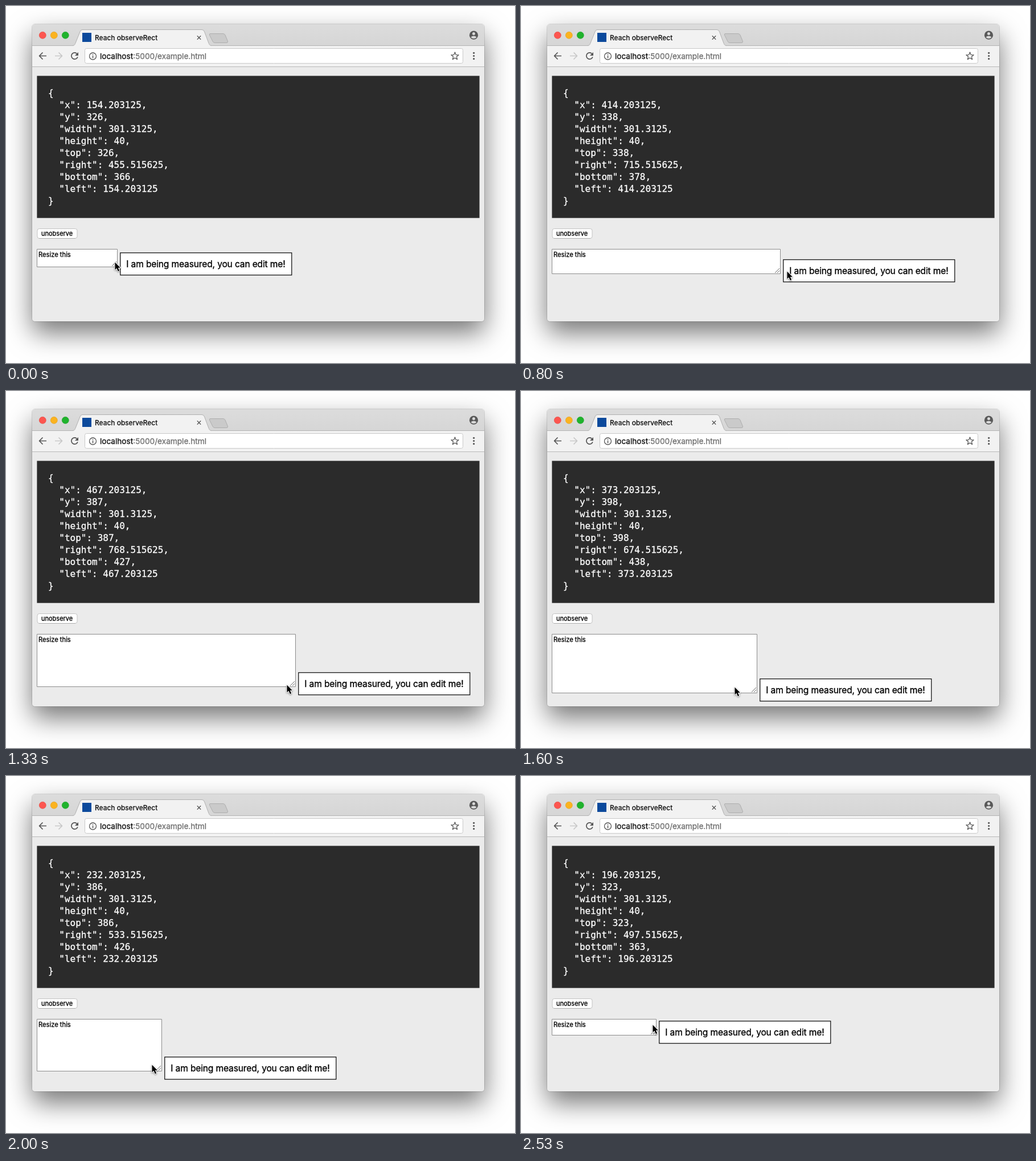
An HTML page with a canvas for the animation above (2600 ms loop, 894x626 px).

```html
<!DOCTYPE html>
<html lang="en">
<head>
<meta charset="utf-8">
<title>observeRect demo</title>
<style>
  html, body { margin: 0; width: 100%; height: 100%; overflow: hidden; background: #fff; }
  canvas { display: block; }
</style>
</head>
<body>
<canvas id="stage" width="894" height="626"></canvas>
<script>
const stage = document.getElementById('stage');
const g = stage.getContext('2d');
const SANS = 'Inter, "Open Sans", sans-serif';
const MONO = '"DejaVu Sans Mono", "Liberation Mono", monospace';
const LOOP = 2600, STEP = 200 / 3;

// [step, x, y] of the measured box, in page coordinates
const PATH = [
  [0, 154, 326], [1, 154, 326], [3, 171, 326], [5, 211, 327], [6, 240, 327],
  [7, 278, 327], [8, 312, 328], [10, 368, 332], [12, 414, 338], [13, 430, 342],
  [14, 445, 349], [16, 465, 364], [17, 467, 369], [18, 468, 375], [19, 471, 381],
  [21, 456, 392], [23, 407, 398], [24, 373, 398], [25, 338, 396], [27, 283, 392],
  [30, 232, 386], [31, 219, 383], [32, 208, 380], [34, 197, 365], [36, 195, 343],
  [38, 196, 323], [39, 194, 313]
];

function slope(i, k) {
  const a = PATH[Math.max(i - 1, 0)], b = PATH[Math.min(i + 1, PATH.length - 1)];
  return (b[k] - a[k]) / (b[0] - a[0]);
}

function boxAt(step) {
  let i = 0;
  while (i < PATH.length - 2 && PATH[i + 1][0] <= step) i++;
  const a = PATH[i], b = PATH[i + 1], span = b[0] - a[0], u = (step - a[0]) / span;
  const hermite = k => {
    const d = b[k] - a[k], m = slope(i, k) * span, n = slope(i + 1, k) * span;
    return Math.round(a[k] + u * (m + u * (3 * d - 2 * m - n + u * (m + n - 2 * d))));
  };
  return { x: hermite(1), y: hermite(2) };
}

// A hairline stroke gives the slightly heavier desktop rendering.
function text(str, x, y, size, color = '#000', family = SANS, spacing = 0) {
  g.font = `${size}px ${family}`;
  g.letterSpacing = spacing + 'px';
  g.fillStyle = g.strokeStyle = color;
  g.lineWidth = .3;
  g.lineJoin = 'round';
  g.fillText(str, x, y);
  g.strokeText(str, x, y);
}

function rect(x, y, w, h, color) {
  g.fillStyle = color;
  g.fillRect(x, y, w, h);
}

function paint(fill, stroke, width = 1) {
  if (fill) { g.fillStyle = fill; g.fill(); }
  if (stroke) { g.strokeStyle = stroke; g.lineWidth = width; g.stroke(); }
}

function rounded(x, y, w, h, r, fill, stroke) {
  g.beginPath();
  g.roundRect(x, y, w, h, r);
  paint(fill, stroke);
}

function circle(x, y, r, fill, stroke, width) {
  g.beginPath();
  g.arc(x, y, r, 0, Math.PI * 2);
  paint(fill, stroke, width);
}

function shape(d, fill, stroke, width) {
  const p = new Path2D(d);
  if (fill) { g.fillStyle = fill; g.fill(p); }
  if (stroke) { g.strokeStyle = stroke; g.lineWidth = width || 1; g.stroke(p); }
}

function drawTabStrip() {
  const bar = g.createLinearGradient(0, 32, 0, 69);
  bar.addColorStop(0, '#dcdcdc');
  bar.addColorStop(1, '#d6d6d6');
  rect(46, 32, 794, 38, bar);
  rect(46, 69, 794, 1, '#b4b4b4');
  rect(46, 70, 794, 36, '#f2f2f2');
  rect(46, 106, 794, 1, '#b9b9b9');
  shape('M117 70C121 69 121 67 122 65L130 45Q131.500 41.500 134 41.500H344Q347 41.500 348.500 45L356 65C357 67 357 69 361 70Z', '#f2f2f2');
  shape('M117 69.500C121 69 121 67 122 65L130 45Q131.500 41.500 134 41.500H344Q347 41.500 348.500 45L356 65C357 67 357 69 361 69.500', null, '#b0b0b0');
  shape('M359 48.500H381Q384 48.500 385 51L389.500 62Q390 64.500 387 64.500H367Q364 64.500 363 62L357.500 51Q356.500 48.500 359 48.500Z', '#cacaca', '#aeaeae');
  circle(64.3, 51.3, 6, '#fc5650', '#e2463f', .6);
  circle(84.3, 51.3, 6, '#fbb320', '#df9d1b', .6);
  circle(104.3, 51.3, 6, '#20b32d', '#1aa026', .6);
  rect(134, 47, 16, 16, '#0c4a9c');
  text('Reach observeRect', 156, 59.5, 12, '#111');
  shape('M335.800 52.300L342.200 58.700M342.200 52.300L335.800 58.700', null, '#555', 1.3);
  circle(821.5, 51.2, 7.6, '#595959');
  circle(821.5, 48.6, 2.5, '#dadada');
  shape('M816.500 54.800Q818.500 52.500 821.500 52.500Q824.500 52.500 826.500 54.800Q824.500 57 821.500 57Q818.500 57 816.500 54.800Z', '#dadada');
}

function drawToolbar() {
  const arrow = (x, color, dir) => {
    g.save();
    g.translate(x, 87.5);
    g.scale(dir, 1);
    shape('M6.500 0H-5.500M0 -6L-6 0L0 6', null, color, 1.7);
    g.restore();
  };
  arrow(64.5, '#555', 1);
  arrow(92.5, '#c8c8c8', -1);
  g.beginPath();
  g.arc(120.5, 87.5, 5.6, .3, 5.5);
  paint(null, '#555', 1.7);
  shape('M127 81V87H121Z', '#555');
  rounded(138.5, 74.5, 664, 26, 3, '#fff', '#c9c9c9');
  circle(152.5, 88, 6, null, '#555', 1.3);
  rect(151.8, 87, 1.5, 4.5, '#555');
  rect(151.8, 84.5, 1.5, 1.5, '#555');
  text('localhost', 165, 93, 13.6, '#111');
  text(':5000/example.html', 223.3, 93, 13.65, '#707070');
  g.beginPath();
  for (let i = 0; i < 10; i++) {
    const a = i * Math.PI / 5 - Math.PI / 2, r = i % 2 ? 3 : 7;
    g.lineTo(788.5 + r * Math.cos(a), 88 + r * Math.sin(a));
  }
  g.closePath();
  paint(null, '#555', 1.3);
  for (const y of [82.3, 87.5, 92.7]) circle(821.7, y, 1.6, '#555');
}

function drawBackdrop() {
  rect(0, 0, 894, 626, '#fff');
  g.save();
  g.shadowColor = 'rgba(0,0,0,.54)';
  g.shadowBlur = 46;
  g.shadowOffsetY = 20;
  rounded(46, 32, 794, 521, 5, '#ebebeb');
  g.restore();
  rounded(45.5, 31.5, 795, 522, 5.5, null, 'rgba(0,0,0,.12)');
  g.save();
  g.beginPath();
  g.roundRect(46, 32, 794, 521, 5);
  g.clip();
  rect(46, 32, 794, 521, '#ebebeb');
  drawTabStrip();
  drawToolbar();
  g.restore();
  rect(54.4, 122.5, 777.2, 249.2, '#2b2b2b');
  rounded(55, 390.5, 70, 17, 3.5, '#fff', '#c3c3c3');
  rect(58, 407, 64, 1, '#adadad');
  text('unobserve', 62, 403, 11);
}

function drawReadout({ x, y }) {
  const left = x + .203125, width = 301.3125;
  const bounds = {
    x: left, y, width, height: 40,
    top: y, right: left + width, bottom: y + 40, left
  };
  JSON.stringify(bounds, null, 2).split('\n').forEach((line, i) =>
    text(line, 74, Math.round(158.4 + 20.92 * i), 16, '#fff', MONO));
}

function drawTextarea(right, bottom) {
  rect(54, 426, right - 54, bottom - 426, '#fff');
  g.lineWidth = 1;
  g.strokeStyle = '#8c8c8c';
  g.strokeRect(54.5, 426.5, right - 55, bottom - 427);
  text('Resize this', 57, 440, 11.2);
  g.beginPath();
  for (const d of [8, 4]) {
    g.moveTo(right - 2 - d, bottom - 2);
    g.lineTo(right - 2, bottom - 2 - d);
  }
  paint(null, '#666', 1);
}

function drawMeasured(x, y) {
  rect(x, y, 302, 40, '#fff');
  g.lineWidth = 1.2;
  g.lineJoin = 'miter';
  g.strokeStyle = '#000';
  g.strokeRect(x + .5, y + .5, 301, 39);
  text('I am being measured, you can edit me!', x + 11, y + 25.7, 15.6, '#000', SANS, -.16);
}

function drawCursor(x, y) {
  g.save();
  g.translate(x, y);
  g.lineJoin = 'round';
  g.shadowColor = 'rgba(0,0,0,.35)';
  g.shadowBlur = 3;
  g.shadowOffsetY = 1;
  const arrow = 'M0 0V13L3 10.300L5.300 15.700L7.700 14.700L5.400 9.400H9.400Z';
  shape(arrow, '#fff', '#fff', 2);
  g.shadowColor = 'transparent';
  shape(arrow, '#000');
  g.restore();
}

drawBackdrop();
const backdrop = document.createElement('canvas');
backdrop.width = stage.width;
backdrop.height = stage.height;
backdrop.getContext('2d').drawImage(stage, 0, 0);

function render(now) {
  const step = Math.min(38, Math.floor((now % LOOP + 3.4) / STEP));
  const box = boxAt(step);
  const pointer = boxAt(step + 1); // layout trails the pointer by one step
  g.drawImage(backdrop, 0, 0);
  drawReadout(box);
  drawTextarea(box.x + 42, box.y + 132);
  drawMeasured(box.x + 46.3, box.y + 106.3);
  drawCursor(pointer.x + 37.5, pointer.y + 123.5);
}

const start = performance.now();
function tick() {
  render(performance.now() - start);
  requestAnimationFrame(tick);
}
tick();
</script>
</body>
</html>
```
